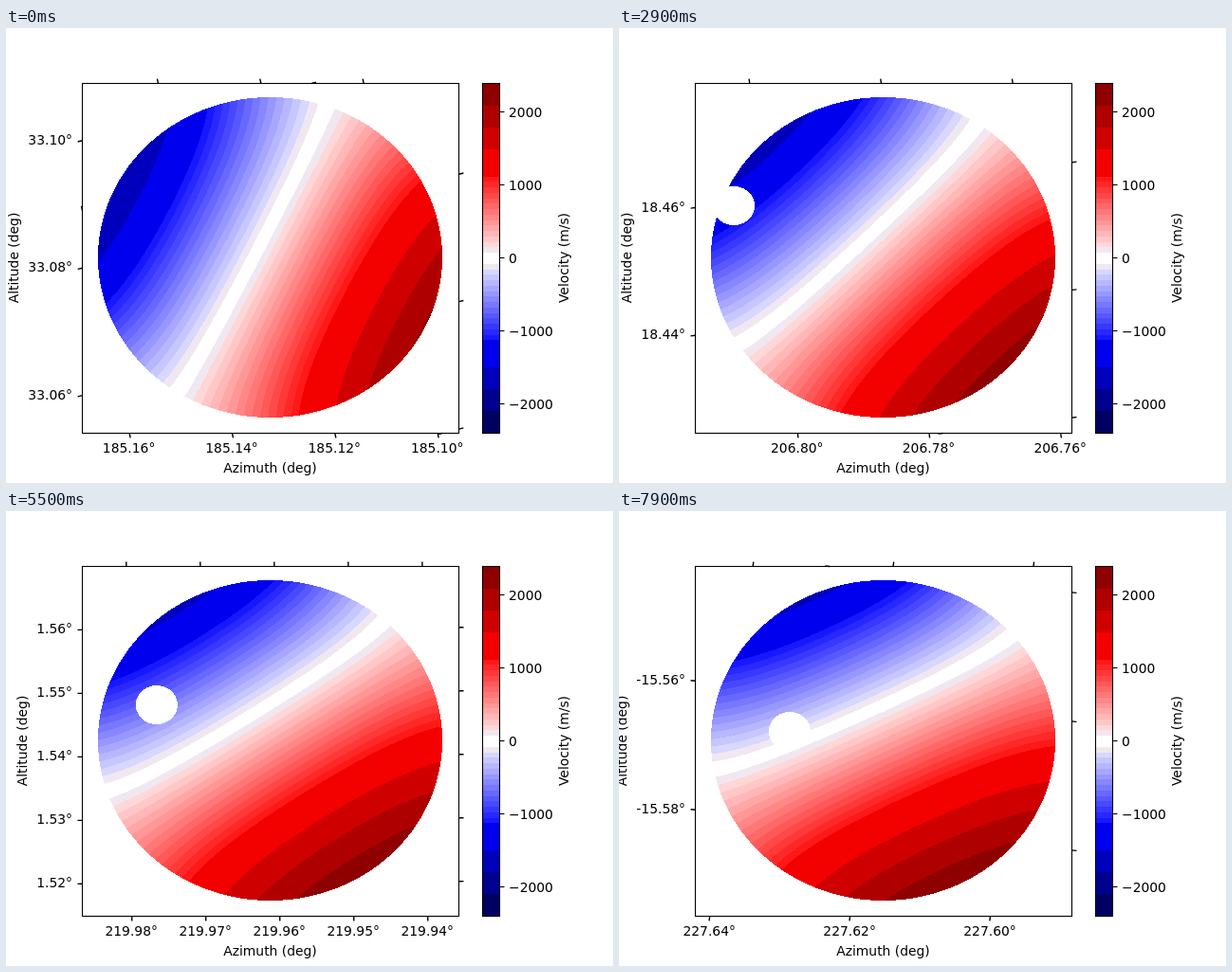
Write an HTML page with a canvas that moves like this. It is 640x480 px and loops after 8 s.

```html
<!DOCTYPE html>
<html lang="en">
<head>
<meta charset="utf-8">
<title>Velocity map of a rotating disc</title>
<style>
  html, body { margin: 0; width: 640px; height: 480px; overflow: hidden; background: #fff; }
  canvas, svg { position: absolute; left: 0; top: 0; display: block; }
  text { font: 13.89px "DejaVu Sans", sans-serif; fill: #000; }
  .mid { text-anchor: middle; }
  .end { text-anchor: end; }
  path, rect { fill: none; stroke: #000; stroke-width: 1.1; }
</style>
</head>
<body>
<canvas id="map" width="640" height="480"></canvas>
<svg width="640" height="480" viewBox="0 0 640 480">
  <path id="ticks" style="stroke-width:1.4"/>
  <rect x="80.5" y="58.5" width="397" height="369"/>
  <g id="labels"></g>
  <text class="mid" x="278.5" y="469">Azimuth (deg)</text>
  <text class="mid" id="altTitle">Altitude (deg)</text>
  <rect x="502.5" y="58.5" width="18" height="369"/>
  <g id="scale"></g>
  <text class="mid" transform="translate(592.5 242.5) rotate(-90)">Velocity (m/s)</text>
</svg>
<script>
const STEP = 100, COUNT = 80;
const BOX = { l: 80.5, t: 58.5, r: 477.5, b: 427.5 };
const DISC = { x: 278.5, y: 242, rx: 181.5, ry: 169 };
const HOLE = { rx: 22, ry: 20.5 };
const SPEED = 1960;      // equatorial velocity, m/s
const MAX = 2400;
const TICK = 5;

// Smooth quantities, sampled at these steps and joined by one polynomial each.
const KNOTS = [0, 10, 29, 41, 48, 62, 79];
const TRACK = {
  alt: [33.08152, 28.74378, 18.45206, 10.95115, 6.32004, -3.35235, -15.56937],
  az: [185.13252, 193.43141, 206.78692, 213.55522, 216.94878, 222.61178, 227.61521],
  altScale: [6722, 6748, 6735, 6720, 6705, 6715, 6800],
  azScale: [5417, 5937, 6935, 7466, 7680, 7818, 7395],
  altTilt: [-99, -82, -47.8, -27.2, -14.8, 8.8, 42.6],
  azTilt: [-78, -72, -50.5, -32.2, -19.5, 8.2, 45.5],
  spin: [25.9, 33.4, 45.2, 51, 53.9, 59, 64.1],
  drift: [168, 221, 299, 341, 361, 384, 389],
  holeX: [61, 84, 121, 140, 150, 166, 180],
  holeY: [205, 194, 187.5, 192.5, 198, 211.5, 232.5]
};

const $ = id => document.getElementById(id);
const ctx = $("map").getContext("2d");

function stateAt(step) {
  const weights = KNOTS.map((a, i) =>
    KNOTS.reduce((w, b, j) => i === j ? w : w * (step - b) / (a - b), 1));
  const state = {};
  for (const key in TRACK) {
    state[key] = TRACK[key].reduce((sum, v, i) => sum + v * weights[i], 0);
  }
  return state;
}

// Colour of the velocity band that holds v: blue, white, red.
function bandColor(v) {
  const a = Math.abs(v);
  if (a < 75) return [255, 255, 255];
  if (a < 150) return [241, 231, 241];
  const mid = a < 1125 ? Math.floor(a / 75) * 75 + 37.5
    : a < 1500 ? 1312.5 : a < 1800 ? 1650 : a < 2100 ? 1950 : 2250;
  const f = mid / (MAX / 2);
  const pale = Math.round(255 * Math.max(0, 1 - f));
  const fade = v > 0 ? 0.5 : 0.7;
  const main = Math.round(255 * (1 - fade * Math.max(0, f - 1)));
  return v > 0 ? [main, pale, pale] : [pale, pale, main];
}

// Lookup table with one entry per 5 m/s.
const LUT = Array.from({ length: 961 }, (_, i) => bandColor((i - 480) * 5 + (i < 480 ? -0.1 : 0.1)));

const ORIGIN = { x: 96, y: 72 };
const image = ctx.createImageData(366, 341);

function drawDisc(s) {
  const turn = s.spin * Math.PI / 180;
  const c = Math.cos(turn), n = Math.sin(turn);
  const data = image.data;
  let p = 0;
  for (let j = 0; j < image.height; j++) {
    const py = ORIGIN.y + j + 0.5;
    const y = (py - DISC.y) / DISC.ry;
    const hy = (py - s.holeY) / HOLE.ry;
    for (let i = 0; i < image.width; i++, p += 4) {
      const px = ORIGIN.x + i + 0.5;
      const x = (px - DISC.x) / DISC.rx;
      const hx = (px - s.holeX) / HOLE.rx;
      if (x * x + y * y > 1 || hx * hx + hy * hy < 1) {
        data[p + 3] = 0;
        continue;
      }
      const lat = (y * c - x * n) ** 2;
      const v = SPEED * (x * c + y * n) * (1 - 0.163 * lat - 0.1215 * lat * lat) + s.drift;
      const rgb = LUT[Math.max(0, Math.min(960, Math.round(v / 5) + 480))];
      data[p] = rgb[0];
      data[p + 1] = rgb[1];
      data[p + 2] = rgb[2];
      data[p + 3] = 255;
    }
  }
  ctx.putImageData(image, ORIGIN.x, ORIGIN.y);
}

// Range of k for which (x, y) + k (dx, dy) lies inside the box, or null.
function clip(x, y, dx, dy) {
  let from = -Infinity, to = Infinity;
  for (const [p, d, lo, hi] of [[x, dx, BOX.l, BOX.r], [y, dy, BOX.t, BOX.b]]) {
    if (Math.abs(d) < 1e-9) {
      if (p < lo || p > hi) return null;
      continue;
    }
    const a = (lo - p) / d, b = (hi - p) / d;
    from = Math.max(from, Math.min(a, b));
    to = Math.min(to, Math.max(a, b));
  }
  return from < to ? [from, to] : null;
}

const spacing = range => range > 0.058 ? 0.02 : 0.01;

// Ticks and labels where the lines of one coordinate leave the box.
function drawCoord(value, gap, lineAt, onLabel) {
  let d = "";
  const first = Math.round(value / gap);
  for (let k = first - 8; k <= first + 8; k++) {
    const v = k * gap;
    const [x, y, vx, vy] = lineAt(v);
    const len = Math.hypot(vx, vy), dx = vx / len, dy = vy / len;
    const span = clip(x, y, dx, dy);
    if (!span) continue;
    span.forEach((at, i) => {
      const ex = x + dx * at, ey = y + dy * at, out = i ? TICK : -TICK;
      d += `M${ex.toFixed(2)} ${ey.toFixed(2)}l${(dx * out).toFixed(2)} ${(dy * out).toFixed(2)}`;
      onLabel(ex, ey, v.toFixed(2) + "°");
    });
  }
  return d;
}

const textTag = (cls, x, y, str) =>
  `<text class="${cls}" x="${x.toFixed(1)}" y="${y.toFixed(1)}">${str}</text>`;

function drawAxes(s) {
  const w = BOX.r - BOX.l, h = BOX.b - BOX.t;
  let html = "";
  const altGap = spacing((h + Math.abs(s.altTilt)) / s.altScale);
  const azGap = spacing((w + Math.abs(s.azTilt)) / s.azScale);
  const altTicks = drawCoord(s.alt, altGap,
    v => [BOX.l, 243 - (v - s.alt) * s.altScale, w, s.altTilt],
    (x, y, str) => { if (x < BOX.l + 0.01) html += textTag("end", 70, y + 4, str); });
  const azTicks = drawCoord(s.az, azGap,
    v => [279 - (v - s.az) * s.azScale, BOX.b, s.azTilt, -h],
    (x, y, str) => { if (y > BOX.b - 0.01) html += textTag("mid", x - 0.5, 448, str); });
  $("ticks").setAttribute("d", altTicks + azTicks);
  $("labels").innerHTML = html;

  let widest = 0;
  for (const el of $("labels").querySelectorAll(".end")) {
    widest = Math.max(widest, el.getComputedTextLength());
  }
  $("altTitle").setAttribute("transform", `translate(${(60 - widest).toFixed(1)} 242.5) rotate(-90)`);
}

function drawScale() {
  const pixels = (BOX.b - BOX.t) / (2 * MAX);
  for (let y = 58; y < 428; y++) {
    const v = MAX - (y + 0.5 - BOX.t) / pixels;
    ctx.fillStyle = `rgb(${bandColor(v)})`;
    ctx.fillRect(502, y, 19, 1);
  }
  let html = "";
  for (let v = -2000; v <= 2000; v += 1000) {
    const y = 243 - v * pixels;
    html += `<path d="M520.5 ${Math.round(y) - 0.5}h5"/>` +
      textTag("", 530, y + 4.8, String(v).replace("-", "\u2212"));
  }
  $("scale").innerHTML = html;
}

let shown = -1;
function tick(now) {
  const step = Math.floor(now / STEP) % COUNT;
  if (step !== shown) {
    shown = step;
    const s = stateAt(step);
    drawDisc(s);
    drawAxes(s);
  }
  requestAnimationFrame(tick);
}

drawScale();
const start = performance.now();
tick(0);
requestAnimationFrame(function begin(now) { tick(Math.max(0, now)); });
</script>
</body>
</html>
```
